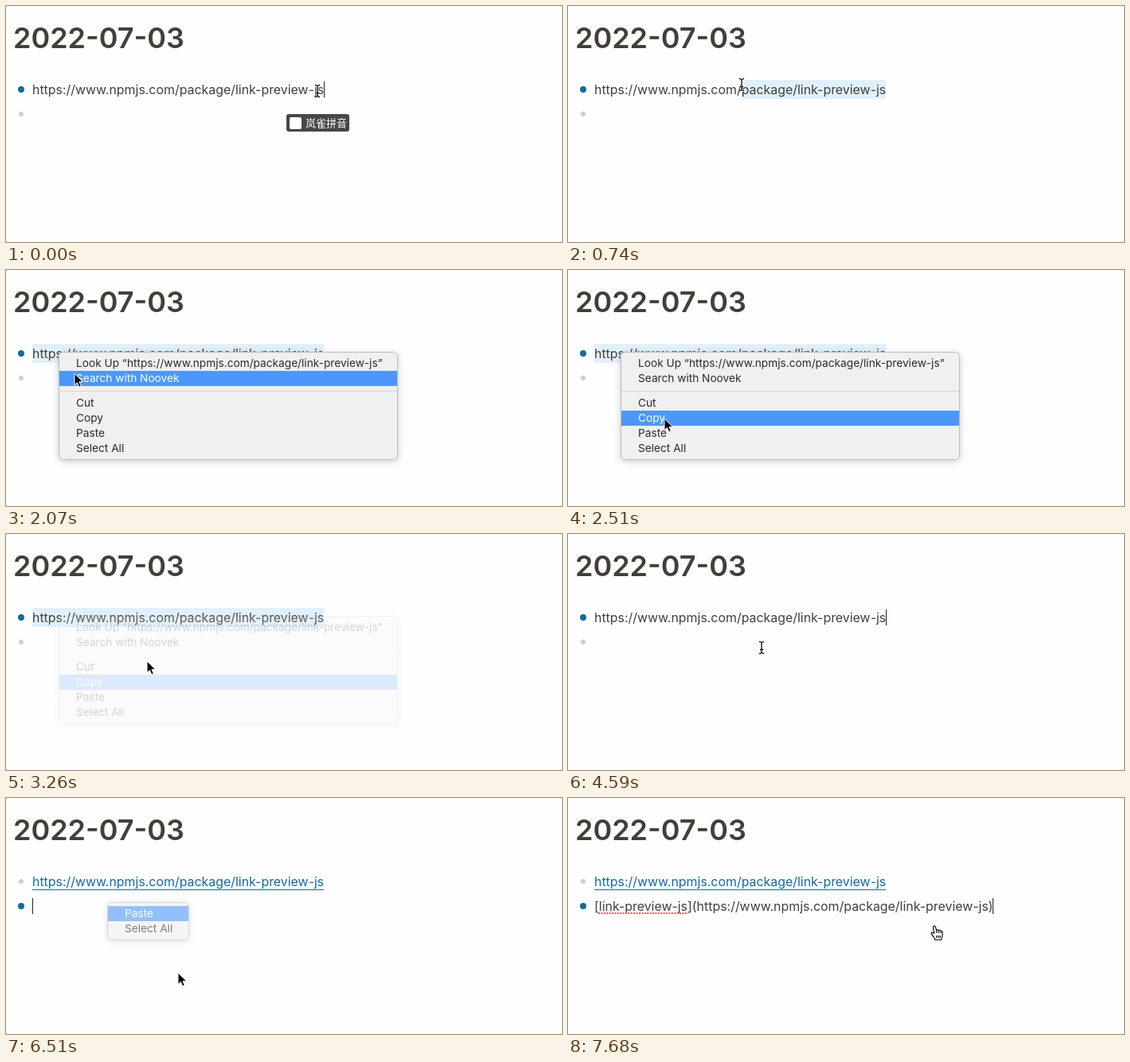
Recreate the animation shown at these times as an HTML page. Size 698 by 297 pixels, loop 8000 ms.

```html
<!DOCTYPE html>
<html lang="en">
<head>
<meta charset="utf-8">
<title>Pasting a link</title>
<style>
html, body { margin: 0; width: 100%; height: 100%; overflow: hidden; background: #fefefe; }
svg { display: block; width: 698px; height: 297px; font: 15.92px Inter, sans-serif; font-optical-sizing: none; fill: #433f38; }
text { white-space: pre; }
.title { font-size: 36px; font-weight: 600; }
.menu { font-size: 13.68px; fill: #2b2b2b; }
.panel { fill: #f0f0f0; stroke: #bdbdbd; filter: drop-shadow(0 2px 4px #0003); }
</style>
</head>
<body>
<svg id="stage" viewBox="0 0 698 297">
  <text class="title" x="9" y="53">2022-07-03</text>
  <circle id="dot1" cx="19" cy="105"/>
  <circle id="dot2" cx="19" cy="136"/>
  <rect id="selection" y="93" height="24" fill="#e1f0fd"/>
  <text id="line1" x="33" y="111"></text>
  <path id="underline" d="M33 115.5H399" stroke="#106ba3"/>
  <text id="line2" x="33" y="142"></text>
  <path id="spelling" d="M38 145H151" stroke="#e5534b" stroke-width="2" stroke-dasharray="2 1.4"/>
  <rect id="caret" width="1" height="20" fill="#222"/>
  <g id="bubble">
    <rect x="352" y="136" width="79" height="22" rx="3" fill="#474747"/>
    <rect x="356" y="140" width="15" height="15" rx="2" fill="#fff"/>
    <text x="376" y="152" font-size="13" font-family="Noto Sans CJK SC, Noto Sans CJK, sans-serif" fill="#fff">岚雀拼音</text>
  </g>
  <g id="cursor">
    <path id="arrow" d="M0 0V14.5L3.4 11.4 5.7 16.8 8.3 15.7 6 10.4H10.6Z" fill="#000" stroke="#fff"/>
    <g id="beam" fill="none">
      <path d="M-3-7.5Q0-7.5 0-5V5Q0 7.5-3 7.5M3-7.5Q0-7.5 0-5V5Q0 7.5 3 7.5M-2 2.5H2" stroke="#fff" stroke-width="2.8"/>
      <path d="M-3-7.5Q0-7.5 0-5V5Q0 7.5-3 7.5M3-7.5Q0-7.5 0-5V5Q0 7.5 3 7.5M-2 2.5H2" stroke="#111" stroke-width="1.3"/>
    </g>
    <path id="hand" d="M-2.5 9.5V8Q-4 5.5-6.5 2.5C-8 0-5.5-1-3.2 1.6L-4.6-5.8Q-4.7-7.7-3.3-7.9T-1.5-6.4L-.5-2.4Q.9-4 2.3-2.3 4-3.4 5-1.5 7-2.2 7.1.6V4Q7 6.2 5.7 8V9.5ZM-.5-2.4L0 1M2.3-2.3L2.6 1M5-1.5L5.1 1M-.3 4V7M2 4V7M4.2 4V7" fill="#fff" stroke="#111" stroke-width="1.2" stroke-linejoin="round"/>
  </g>
</svg>
<script>
const LOOP = 8000, TICK = 147.7;
const URL_TEXT = "https://www.npmjs.com/package/link-preview-js";
const ROW = 19, BLUE = "#106ba3", INK = "#433f38";
const $ = id => document.getElementById(id);
const set = (el, attrs) => { for (const k in attrs) el.setAttribute(k, attrs[k]); };
const show = (id, on) => $(id).style.display = on ? "" : "none";

function add(parent, tag, attrs, text = "") {
  const el = document.createElementNS("http://www.w3.org/2000/svg", tag);
  set(el, attrs);
  el.textContent = text;
  return parent.appendChild(el);
}

function makeMenu(x, y, w, h, items) {
  const g = add($("stage"), "g", { class: "menu" });
  add(g, "rect", { class: "panel", x: x + .5, y: y + .5, width: w - 1, height: h - 1, rx: 5 });
  const rows = items.map(([label, top]) => ({
    top,
    bar: add(g, "rect", { x: x + 1, y: top, width: w - 2, height: ROW, fill: "#4a98fd" }),
    text: add(g, "text", { x: x + 22, y: top + 14 }, label)
  }));
  return { g, rows };
}

// Highlights the row under the pointer height
function drawMenu({ g, rows }, opacity, pointerY) {
  g.style.opacity = opacity;
  for (const { top, bar, text } of rows) {
    const on = pointerY >= top && pointerY < top + ROW;
    bar.style.display = on ? "" : "none";
    text.style.fill = on ? "#fff" : "";
  }
}

const editMenu = makeMenu(66, 103, 426, 136, [
  [`Look Up “${URL_TEXT}”`, 108], ["Search with Noovek", 127],
  ["Cut", 158], ["Copy", 177], ["Paste", 196], ["Select All", 215]
]);
add(editMenu.g, "path", { d: "M67 152.5H491", stroke: "#d6d6d6" });
const pasteMenu = makeMenu(127, 131, 103, 48, [["Paste", 136], ["Select All", 155]]);
$("stage").append($("cursor"));

// Pointer stops: tick, x, y
const path = [
  [0, 391, 107], [1, 398, 105], [2, 396, 102], [8, 40, 96], [9, 34, 100], [11, 65, 110],
  [12, 65, 104], [13, 70, 110], [16, 118, 171], [17, 121, 187], [18, 121, 187],
  [19, 121, 185], [20, 121, 185], [21, 135, 180], [22, 177, 160], [26, 423, 104],
  [28, 423, 103], [31, 243, 143], [33, 123, 140], [36, 123, 140], [38, 140, 146],
  [41, 165, 150], [43, 165, 150], [44, 216, 220], [45, 222, 224], [51, 448, 169], [52, 463, 169]
];

function pointer(n) {
  const i = path.findIndex(p => p[0] > n);
  if (i < 0) return path.at(-1).slice(1);
  const [a, ax, ay] = path[i - 1], [b, bx, by] = path[i];
  const k = (n - a) / (b - a);
  return [ax + (bx - ax) * k, ay + (by - ay) * k];
}

function drawText(n) {
  const second = n >= 33, pasted = n >= 46, formatted = n >= 49;
  set($("dot1"), { r: second ? 3 : 4, fill: second ? "#cfcfcf" : BLUE });
  set($("dot2"), { r: second ? 4 : 3, fill: second ? BLUE : "#cfcfcf" });
  $("line1").textContent = URL_TEXT;
  $("line1").style.fill = second ? BLUE : INK;
  $("line2").textContent = formatted ? `[link-preview-js](${URL_TEXT})` : pasted ? URL_TEXT : "";
  show("underline", second);
  show("spelling", formatted);

  const selected = n >= 2 && n < 27;
  const left = n < 9 ? pointer(n)[0] : 33;
  show("selection", selected);
  set($("selection"), { x: left, width: Math.max(0, 399 - left) });
  show("caret", !selected);
  set($("caret"), {
    x: formatted ? 533 : second && !pasted ? 33 : 399,
    y: second ? 126 : 95
  });
}

function draw(n) {
  const [x, y] = pointer(n);
  drawText(n);
  show("bubble", n < 2);

  const editOpacity = n < 13 || n > 22 ? 0 : n === 22 ? .19 : n === 21 ? .9 : 1;
  drawMenu(editMenu, editOpacity, n >= 17 ? 186 : y);
  const pasteOpacity = n < 35 || n > 45 ? 0 : n === 45 ? .12 : n === 44 ? .6 : 1;
  drawMenu(pasteMenu, pasteOpacity, n >= 38 ? 145 : 0);

  const hand = n >= 51;
  const beam = n < 13 || n >= 24 && n < 37;
  show("hand", hand);
  show("beam", beam);
  show("arrow", !hand && !beam);
  set($("cursor"), { transform: `translate(${x} ${y})` });
}

function frame() {
  draw(Math.floor((performance.now() % LOOP + 8) / TICK));
  requestAnimationFrame(frame);
}
frame();
</script>
</body>
</html>
```
